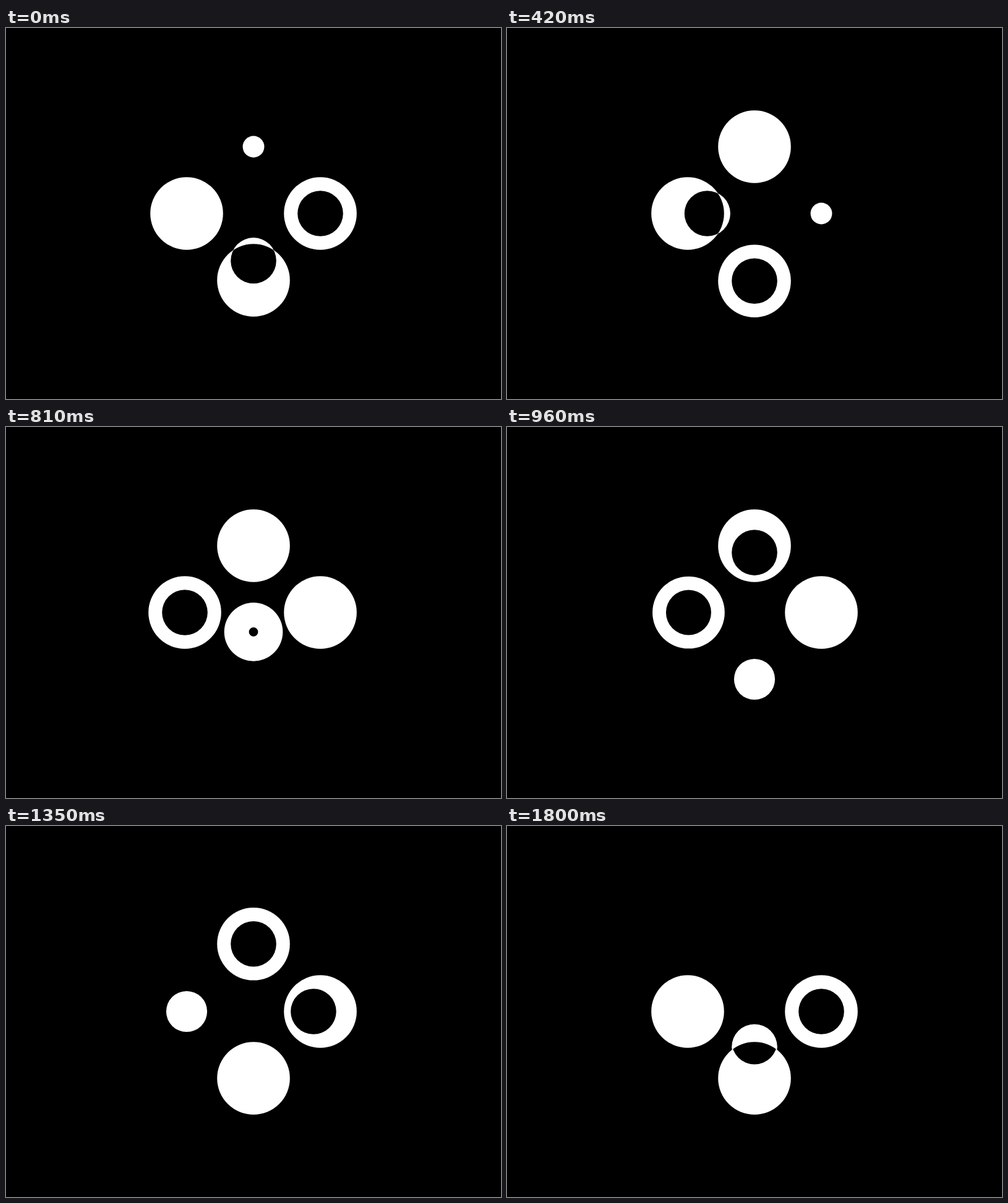
Animation of 800 by 600 pixels, one loop 1830 ms. Source, as an HTML page:

```html
<!DOCTYPE html>
<html lang="en">
<head>
<meta charset="utf-8">
<title>Bouncing rings</title>
<style>
  html, body { margin: 0; width: 100%; height: 100%; overflow: hidden; background: #000; }
  svg { display: block; width: 100vw; height: 100vh; }
</style>
</head>
<body>
<svg id="stage" viewBox="0 0 800 600"></svg>
<script>
const STEP = 30, STEPS = 61;
const ARM = 108, DISC = 58.8, HOLE = 36.8, OVERSHOOT = 21.3;
const LEAD = 14, FLIGHT = 20, RETURN = 10;

// Each hop carries a ring across the centre; phase 0 is just before it lands.
const hops = [
  { angle: 90,  start: 0,  length: 31 },
  { angle: 180, start: 14, length: 30 },
  { angle: 270, start: 31, length: 30 },
  { angle: 0,   start: 44, length: 31 }
];

const clamp = x => Math.min(1, Math.max(0, x));

// Timing curve like cubic-bezier(x1, 0, x2, 1).
function bezier(x1, x2) {
  return input => {
    const x = clamp(input);
    let low = 0, high = 1;
    for (let i = 0; i < 30; i++) {
      const t = (low + high) / 2, u = 1 - t;
      if (3 * x1 * t * u * u + 3 * x2 * t * t * u + t ** 3 < x) low = t;
      else high = t;
    }
    return low * low * (3 - 2 * low);
  };
}

const riderEase = bezier(0.74, 0.4);
const holeEase = bezier(0.74, 0.5);
const returnEase = bezier(0.5, 0.46);
const growEase = bezier(0.12, 0);

function add(parent, name, attrs) {
  const node = document.createElementNS("http://www.w3.org/2000/svg", name);
  for (const key in attrs) node.setAttribute(key, attrs[key]);
  return parent.appendChild(node);
}

function place(circle, x, r) {
  circle.setAttribute("cx", x);
  circle.setAttribute("r", r);
}

const stage = document.getElementById("stage");
add(stage, "rect", { width: 800, height: 600, fill: "#000" });

hops.forEach((hop, i) => {
  hop.group = add(stage, "g", { transform: `translate(400 300) rotate(${hop.angle})` });
  const clip = add(hop.group, "clipPath", { id: "target" + i });
  const circle = fill => add(hop.group, "circle", { fill });
  hop.mask = add(clip, "circle", {});
  hop.fresh = circle("#fff");
  hop.rider = circle("#fff");
  hop.riderHole = circle("#000");
  hop.target = circle("#fff");
  hop.hole = circle("#000");
  hop.hole.setAttribute("clip-path", `url(#target${i})`);
});

function drawHop(hop, step) {
  const phase = (step - hop.start + LEAD + STEPS) % STEPS - LEAD;
  const active = phase < hop.length - LEAD;
  hop.group.setAttribute("display", active ? "inline" : "none");
  if (!active) return;

  const flight = (phase + LEAD) / FLIGHT;
  const riderX = ARM * (2 * riderEase(flight) - 1);
  const holeX = -ARM + (2 * ARM + OVERSHOOT) * holeEase(flight)
    - OVERSHOOT * returnEase((phase + LEAD - FLIGHT) / RETURN);
  const targetX = Math.max(ARM, holeX);

  // The ring contracts, its opening closes, then it shrinks to the size of the hole.
  const contracted = DISC - 11.5 * clamp((phase + 13) / 6) ** 1.8;
  const riderR = contracted - (DISC - 11.5 - HOLE) * clamp((phase + 4) / 3);
  const opening = contracted * HOLE / DISC * (1 - clamp((phase + 7) / 4));

  place(hop.fresh, -ARM, DISC * growEase((phase + 1) / 10));
  place(hop.rider, riderX, riderR);
  place(hop.riderHole, riderX, opening);
  place(hop.target, targetX, DISC);
  place(hop.mask, targetX, DISC);
  place(hop.hole, holeX, HOLE);
}

function draw(ms) {
  const step = Math.floor(ms / STEP) % STEPS;
  hops.forEach(hop => drawHop(hop, step));
}

let begin;
function tick(now) {
  begin ??= now;
  draw(Math.max(0, now - begin));
  requestAnimationFrame(tick);
}
draw(0);
requestAnimationFrame(tick);
</script>
</body>
</html>
```
